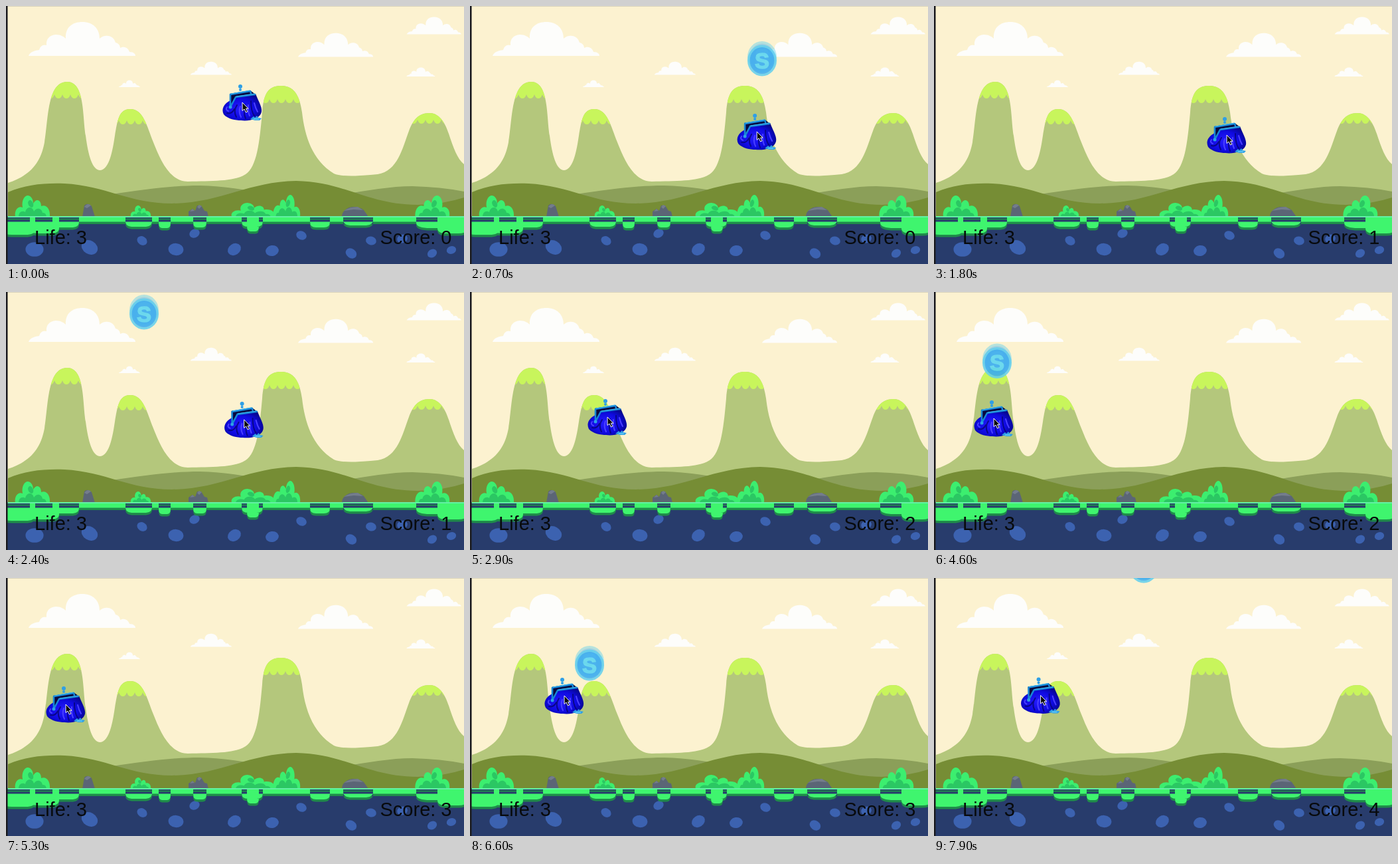
Recreate the animation shown at these times as an HTML page. Size 690 px wide and 388 px high, loop 8000 ms.

```html
<!DOCTYPE html>
<html lang="en">
<head>
<meta charset="utf-8">
<title>Coin catcher</title>
<style>
html, body { margin: 0; width: 100%; height: 100%; overflow: hidden; background: #1c1c20; }
svg { display: block; width: 690px; height: 388px; }
text { font-family: "Liberation Sans", Arial, sans-serif; }
.hud { font-size: 29px; fill: #080a0c; }
</style>
</head>
<body>
<svg viewBox="0 0 690 388" xmlns="http://www.w3.org/2000/svg">
  <defs>
    <!-- the base line of the cloud is y = 0 -->
    <path id="cloud" d="M-81 0C-79 -6 -72 -8 -65 -9C-63 -16 -58 -17 -54 -16C-55 -26 -49 -31 -40 -32C-33 -32 -28 -29 -25 -26C-26 -43 -15 -51 0 -51C16 -51 26 -41 26 -26C33 -33 47 -32 50 -20C55 -19 57 -15 57 -12C65 -16 70 -10 71 -6C77 -6 80 -3 80 0Z"/>
    <path id="peaks" d="M3 266C40 254 53 232 58 205C64 170 62 114 92 114C119 114 115 165 120 195C124 225 130 247 142 247C156 246 161 215 164 195C168 172 170 155 187 155C207 155 212 180 222 205C232 230 246 264 274 264C310 263 345 264 361 253C378 242 382 205 386 160C388 130 396 120 415 120C437 120 443 140 446 160C450 195 461 232 494 252C505 257 530 256 560 253C590 248 597 215 607 188C613 172 621 161 638 161C655 161 663 180 667 192C674 213 680 230 690 238V320H3Z"/>
    <clipPath id="peakClip"><use href="#peaks"/></clipPath>
    <g id="bush">
      <path fill="#3cee6f" d="M0 32C-2 20 6 15 11 18C9 7 14 0 19 0C25 1 27 7 27 12C32 3 39 7 39 16C47 13 53 21 52 32Z"/>
      <path fill="#2bc763" d="M5 32C5 24 11 22 15 25C17 16 26 16 28 24C32 17 40 19 41 26Q46 25 47 32ZM19 11C20 6 24 5 27 12Q28 17 25 18 20 17 19 11Z"/>
    </g>
    <radialGradient id="cloth" cx=".45" cy=".55" r=".6">
      <stop offset="0" stop-color="#261cff"/>
      <stop offset=".6" stop-color="#0f0ae0"/>
      <stop offset="1" stop-color="#060688"/>
    </radialGradient>
    <g id="disc">
      <ellipse rx="22" ry="23.5" fill="#62cfee"/>
      <ellipse rx="18.5" ry="20" fill="#3aabf0"/>
      <text y="11.500" text-anchor="middle" font-size="33" font-weight="700" fill="#62d9f0" stroke="#62d9f0" stroke-width="1.5">S</text>
    </g>
  </defs>

  <rect width="690" height="388" fill="#fcf2d0"/>
  <rect width="690" height="1" fill="#d8d2bd"/>
  <g id="clouds" fill="#fdfdfb"></g>

  <use href="#peaks" fill="#b4c77c"/>
  <g id="caps" fill="#c8f55c" clip-path="url(#peakClip)"></g>

  <path fill="#8b9f59" d="M160 283C210 276 250 270 292 270C330 271 360 276 390 283V305H160ZM505 284C540 278 580 271 612 271Q655 272 690 279V305H505Z"/>
  <path fill="#768d35" d="M3 280C30 269 55 266 88 267C150 270 185 297 250 297C325 296 365 264 437 263C510 264 545 299 620 299Q660 298 690 288V320H3Z"/>

  <use href="#bush" x="14" y="285"/>
  <use href="#bush" transform="translate(188 300) scale(.58 .53)"/>
  <use href="#bush" transform="translate(340 296) scale(1.25 .65)"/>
  <use href="#bush" transform="translate(443 284) scale(-.78 1.03)"/>
  <use href="#bush" transform="translate(668 285) scale(-.99 1)"/>

  <g fill="#5b6576">
    <path d="M115 317L118 300Q123 295 129 301L134 317Z"/>
    <path d="M275 317V309L281 305 285 308 288 300 294 300 299 308 303 309 305 317Z"/>
    <path d="M506 317Q506 308 517 303 530 300 539 307L546 317Z"/>
  </g>
  <path fill="#747d8c" d="M118 302Q123 295 128 300L122 304ZM288 302L291 299 295 301 291 305ZM277 309L281 305 284 308ZM509 308Q517 302 530 302L538 307 524 306Z"/>

  <rect y="316" width="690" height="72" fill="#283c6c"/>
  <g id="stones" fill="#3c62b0"></g>
  <g id="grass"></g>
  <rect y="316" width="690" height="2" fill="#62f0a4"/>

  <text class="hud" x="43" y="358">Life: 3</text>
  <text class="hud" id="score" x="563.500" y="358">Score: 0</text>

  <g id="purse">
    <path fill="url(#cloth)" d="M-18 -4C-28 1 -32 9 -28 17C-22 24 -10 26 -2 26C10 28 25 23 28 16C32 9 25 -1 20 -14L-16 -13Z"/>
    <g fill="none" stroke-linecap="round">
      <path stroke="#05046a" stroke-width="2" opacity=".75" d="M-8 3Q-14 12 -9 21M4 2Q1 14 5 23M13 -3Q13 12 18 19M-23 15Q-16 17 -12 9"/>
      <path stroke="#4a40ff" stroke-width="2" d="M-3 5Q-6 13 -2 21M9 3Q8 12 11 19M18 0Q20 8 23 13M-23 6Q-26 10 -21 12"/>
      <path fill="#07083f" stroke="none" d="M-18 6L-19 -14 12 -19 20 -13 -9 -9Z"/>
      <path stroke="#1787d6" stroke-width="2.6" stroke-linejoin="round" d="M-18 6V-13L12 -18 13 -15M-18 6L-10 -9 19 -13"/>
      <path stroke="#43b9f2" stroke-width="1" d="M-17 -14L11 -19M-9 -10L18 -14"/>
    </g>
    <g fill="#2e9fe6">
      <circle cx="-3" cy="-25" r="3"/>
      <circle cx="-3" cy="-20" r="2"/>
      <circle cx="-18" cy="6" r="2.5"/>
      <path d="M12 24L17 20 19 22 22 19 24 22 29 23 26 26 19 26Z"/>
    </g>
    <path d="M17 24H25" stroke="#72d5f5" stroke-width="1.3"/>
    <path d="M0 -1V11.500L3 9 5.500 14 7.800 13 5.500 8.300H9Z" fill="#0a0a0a" stroke="#f4f4ff"/>
  </g>

  <g id="coin">
    <use href="#disc" y="-5.500" opacity=".45"/>
    <use href="#disc" opacity=".85"/>
  </g>
  <rect width="2.500" height="388" fill="#1c1c20"/>
</svg>
<script>
const $ = id => document.getElementById(id);
const fill = (id, items, draw) => { $(id).innerHTML = items.map(draw).join(''); };

// middle, base line, width
fill('clouds', [[115, 75, 161], [497, 76.5, 113], [309, 103.5, 62], [186, 122, 32], [645, 42.5, 82], [625, 106, 43]],
  ([x, y, w]) => `<use href="#cloud" transform="translate(${x} ${y}) scale(${w / 161})"/>`);

// each peak gets a cap with a scalloped edge
fill('caps', [[91, 133], [188, 172], [415, 140], [638, 171]],
  ([x, y]) => `<path d="M${x - 30} ${y - 25}V${y}${'q2 6 6 6t6 -6'.repeat(5)}V${y - 25}Z"/>`);

// stones deep in the soil are larger
fill('stones', [[43, 366], [126, 363], [205, 353], [256, 366], [284, 342], [344, 366], [401, 368],
  [445, 345], [520, 372], [550, 353], [597, 350], [642, 372], [671, 367]], ([x, y], i) => {
  const r = y > 360 ? 14 - x / 100 : 8;
  return `<ellipse rx="${r}" ry="${r * 0.8}" transform="translate(${x} ${y}) rotate(${35 * Math.sin(i)})"/>`;
});

// turf strip with hanging drops: left, width, lower edge
const drops = [[-6, 50, 344], [36, 44, 342], [70, 40, 333], [180, 40, 332], [230, 18, 334], [282, 20, 333],
  [355, 32, 332], [363, 18, 339], [458, 30, 333], [508, 45, 330], [618, 72, 334], [650, 45, 342]];
const turf = drops.map(([x, w, y]) => `M${x} 318V${y - 8}q0 8 ${w * 0.3} 8h${w * 0.4}q${w * 0.3} 0 ${w * 0.3} -8V318Z`).join('');
fill('grass', [['#1f8c4a', 3.5], ['#3ff56e', 0]],
  ([color, y]) => `<path fill="${color}" transform="translate(0 ${y})" d="M0 316H690V324.500H0Z${turf}"/>`);

const LOOP = 8000, STEP = 100;
const FIRST = 200, PERIOD = 1900, CATCH = 780, SPEED = 0.245;
const coinX = [440, 208, 95, 180, 316];
// start, duration, x, y
const moves = [[300, 500, 441, 195], [2200, 500, 207, 189], [3600, 300, 252, 196],
  [3980, 520, 90, 191], [5800, 600, 142, 178], [7650, 480, 177, 177]];

function purseAt(t) {
  let x = 356, y = 146;
  for (const [t0, d, toX, toY] of moves) {
    const k = Math.min(1, Math.max(0, (t - t0) / d)), ease = k * k * (3 - 2 * k);
    x += (toX - x) * ease;
    y += (toY - y) * ease;
  }
  return [x, y];
}

const place = (id, x, y) => $(id).setAttribute('transform', `translate(${x} ${y})`);
const start = performance.now();

function draw(now) {
  const time = Math.max(0, now - start) % LOOP;
  const t = Math.floor(time / STEP) * STEP;
  const n = Math.floor((t - FIRST) / PERIOD);
  const age = t - FIRST - n * PERIOD;
  const falling = n >= 0 && age < CATCH;
  place('purse', ...purseAt(t));
  place('coin', falling ? coinX[n] : 0, falling ? SPEED * age - 40.5 : -99);
  $('score').textContent = 'Score: ' + (n < 0 || falling ? Math.max(0, n) : n + 1);
  requestAnimationFrame(draw);
}
draw(start);
</script>
</body>
</html>
```
